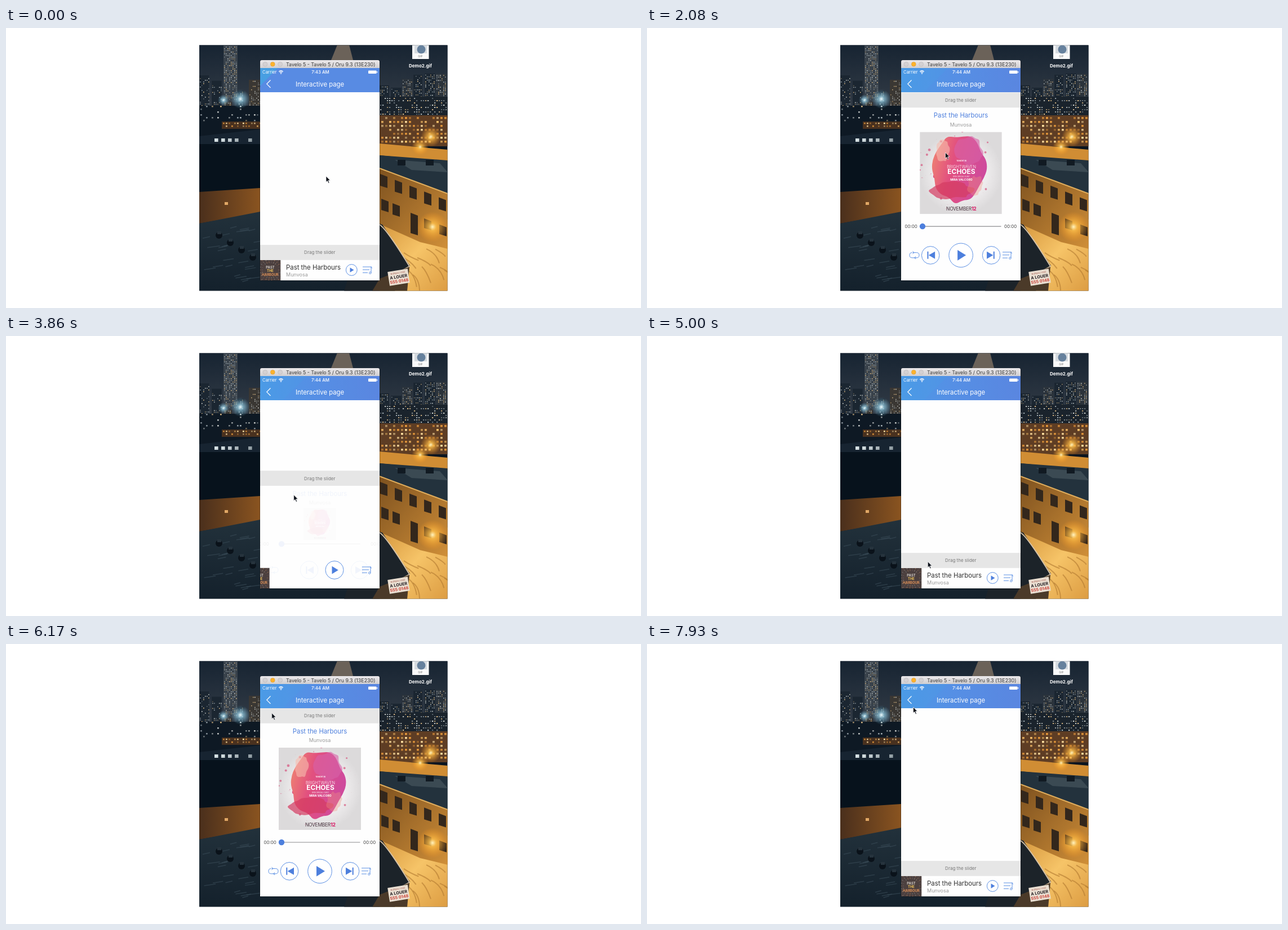
An HTML page for the animation above (8000 ms loop, 1127 by 497 pixels).

```html
<!DOCTYPE html>
<html lang="en">
<head>
<meta charset="utf-8">
<title>Interactive page</title>
<style>
html, body { margin: 0; width: 100%; height: 100%; overflow: hidden; background: #fff; }
svg { display: block; width: 1127px; height: 497px; font-family: Inter, sans-serif; }
.thin { fill: none; stroke: #5b8fe3; stroke-width: 1; vector-effect: non-scaling-stroke; }
.solid { fill: #4d7fdd; }
</style>
</head>
<body>
<svg viewBox="0 0 1127 497">
  <defs>
    <clipPath id="photoClip"><rect x="343" y="30.500" width="440.500" height="436"/></clipPath>
    <clipPath id="screenClip"><rect x="451" y="114" width="212" height="334"/></clipPath>
    <clipPath id="thumbClip"><rect width="36.500" height="36.500"/></clipPath>
    <clipPath id="coverClip"><rect width="146" height="146"/></clipPath>
    <linearGradient id="sky" x2="0" y2="1"><stop stop-color="#172432"/><stop offset="1" stop-color="#38404a"/></linearGradient>
    <linearGradient id="roof" x2="0" y2="1"><stop stop-color="#22313b"/><stop offset="1" stop-color="#14212c"/></linearGradient>
    <linearGradient id="wall" x2="1" y2="0"><stop stop-color="#4a2f1c"/><stop offset="1" stop-color="#8a5420"/></linearGradient>
    <linearGradient id="brick" x2="1" y2="1"><stop stop-color="#7d511f"/><stop offset="1" stop-color="#d08f38"/></linearGradient>
    <linearGradient id="street" x2="1" y2="1"><stop stop-color="#d3933a"/><stop offset=".5" stop-color="#f6c468"/><stop offset="1" stop-color="#dc9c42"/></linearGradient>
    <radialGradient id="warm"><stop stop-color="#fff3c0"/><stop offset=".25" stop-color="#ffc04a" stop-opacity=".8"/><stop offset="1" stop-color="#ff9a20" stop-opacity="0"/></radialGradient>
    <radialGradient id="cool"><stop stop-color="#f4ffff"/><stop offset=".3" stop-color="#9fd8ee" stop-opacity=".7"/><stop offset="1" stop-color="#6ab0d0" stop-opacity="0"/></radialGradient>
    <linearGradient id="bar" x2="0" y2="1"><stop stop-color="#ebe8ea"/><stop offset="1" stop-color="#d1cfd1"/></linearGradient>
    <linearGradient id="nav"><stop stop-color="#4c99e6"/><stop offset=".4" stop-color="#5590e5"/><stop offset="1" stop-color="#5a86e0"/></linearGradient>
    <radialGradient id="paper"><stop stop-color="#fff"/><stop offset=".65" stop-color="#edebec"/><stop offset="1" stop-color="#dcdadb"/></radialGradient>
    <linearGradient id="ink" x2="1" y2=".3"><stop stop-color="#f08a70"/><stop offset=".45" stop-color="#e2507f"/><stop offset="1" stop-color="#cf4a9c"/></linearGradient>
  </defs>
  <g id="photo" clip-path="url(#photoClip)"></g>
  <g id="phone"></g>
  <g id="screen" clip-path="url(#screenClip)"></g>
  <path id="cursor" d="M0 0V10.500L2.400 8.300 4.300 12.400 5.900 11.700 4.100 7.600H7.400Z" fill="#0a0f18" stroke="#fff" stroke-width=".7"/>
</svg>
<script>
const $ = id => document.getElementById(id);

let seed = 11;
const rnd = (lo = 0, hi = 1) => lo + (hi - lo) * ((seed = (seed * 16807) % 2147483647) / 2147483647);
const pick = list => list[Math.floor(rnd(0, list.length))];
const repeat = (n, fn) => Array.from({ length: n }, (_, i) => fn(i)).join('');

const rect = (x, y, w, h, fill, more = '') =>
  `<rect x="${x}" y="${y}" width="${w}" height="${h}" fill="${fill}" ${more}/>`;
const poly = (pts, fill) => `<polygon points="${pts}" fill="${fill}"/>`;
const dot = (x, y, r, fill, more = '') => `<circle cx="${x}" cy="${y}" r="${r}" fill="${fill}" ${more}/>`;
const path = (d, more) => `<path d="${d}" ${more}/>`;
const text = (x, y, size, str, fill, more = '') =>
  `<text x="${x}" y="${y}" font-size="${size}" fill="${fill}" ${more}>${str}</text>`;
const mid = 'text-anchor="middle"';
const bold = mid + ' font-weight="700"';
const group = (id, body, more = '') => `<g id="${id}" ${more}>${body}</g>`;

const amber = ['#ffc56a', '#e89a3c', '#ffe0a0'];
const pale = ['#d8dcd8', '#a9b4ba', '#e8c48c'];

// Scattered lit windows inside a box
function lights(x, y, w, h, step, chance, colors) {
  let out = '';
  for (let j = 0; j < h; j += step)
    for (let i = 0; i < w; i += step)
      if (rnd() < chance)
        out += rect(x + i, y + j, step * .55, step * .5, pick(colors), `opacity="${rnd(.35, 1)}"`);
  return out;
}

const tower = (x, y, w, h, fill, chance) =>
  rect(x, y, w, h, fill) + lights(x + 1, y + 2, w - 2, h - 3, 3, chance, pale);

// A row of towers with random sizes
const skyline = (x, n, gap, top) => repeat(n, i =>
  tower(x + i * gap, rnd(top, top + 28), rnd(.6, 1) * gap, 75, pick(['#1b2631', '#2b333b', '#3a3733']), rnd(.25, .6)));

// Windows along a wall that falls away to the right
const windows = (x, y, n, gap, h) => repeat(n, i => {
  const a = x + i * gap, b = y + i * gap * .4;
  return poly(`${a},${b} ${a + 13},${b + 5} ${a + 13},${b + h + 4} ${a},${b + h}`, '#33271c');
});

function leftSide() {
  let s = skyline(343, 5, 22, 84) + tower(386, 31, 25, 100, '#39424b', .6);
  s += rect(343, 138, 108, 54, '#0e1924') + lights(345, 138, 104, 26, 5, .2, pale);
  s += rect(383, 166, 68, 13, '#49311f') + lights(385, 168, 66, 10, 5, .6, amber);
  s += dot(416, 126, 17, 'url(#cool)') + dot(386, 128, 10, 'url(#cool)');
  s += poly('343,192 451,180 451,206 343,206', '#172431') + rect(343, 206, 108, 86, '#07121c');
  s += lights(358, 196, 80, 8, 12, .4, ['#d9e3e6']);
  s += poly('343,291 451,284 451,328 343,347', 'url(#wall)') + rect(388, 309, 6, 5, '#e0a765');
  s += poly('343,347 451,326 700,466 343,466', 'url(#roof)');
  s += repeat(26, () => path(`M${rnd(346, 442)} ${rnd(355, 460)}l${rnd(10, 24)} -3`,
    'stroke="#3a4c58" stroke-width="1.500" opacity=".6"'));
  return s + repeat(4, i => dot(378 + 20 * i, 368 + 13 * i, 6, '#0a121a') + rect(375 + 20 * i, 361 + 13 * i, 7, 5, '#26333d'));
}

function rightSide() {
  let s = skyline(663, 6, 20, 80);
  s += rect(663, 122, 121, 36, '#1a232c') + lights(664, 124, 118, 30, 4, .45, pale);
  s += rect(663, 155, 121, 55, '#5e3d24') + lights(666, 158, 116, 45, 7, .8, amber);
  s += poly('663,205 784,216 784,238 663,226', '#d08d34');
  s += dot(754, 193, 18, 'url(#warm)') + dot(735, 211, 15, 'url(#warm)');
  s += poly('663,226 784,235 784,294 663,249', '#23323d') + poly('690,234 770,240 784,256 720,252', '#3b4a53');
  s += repeat(2, i => rect(695 + 50 * i, 234, 14, 10, '#111a22'));
  s += rect(663, 340, 121, 127, 'url(#street)');
  s += poly('663,249 784,294 784,392 735,380 663,348', 'url(#brick)');
  s += path('M663 249 784 294', 'stroke="#e0ad5c" stroke-width="2"');
  s += windows(664, 259, 5, 26, 21) + windows(666, 303, 2, 20, 20) + windows(742, 338, 2, 27, 17) + windows(718, 328, 1, 0, 36);
  s += repeat(12, i => path(`M${690 + 8 * i} ${388 + rnd(0, 50)}q${rnd(8, 20)} 8 ${rnd(12, 30)} ${rnd(12, 30)}`,
    'fill="none" stroke="#b27a31" stroke-width="2" opacity=".6"'));
  return s + dot(757, 353, 27, 'url(#warm)');
}

function city() {
  let s = rect(343, 30, 441, 437, '#0a1520') + rect(343, 30, 441, 130, 'url(#sky)');
  s += poly('577,57 588,30 609,30 616,57', '#6b6259') + leftSide() + rightSide();
  // near roof and rental sign
  s += poly('640,340 668,349 717,422 690,467 600,467', '#1c2329');
  s += path('M663 349Q675 356 716 423L674 447', 'fill="none" stroke="#d9c4a8" stroke-width="2"');
  s += poly('663,445 716,424 712,467 650,467', '#4b3a29');
  s += '<g transform="translate(697 443) rotate(-9)">' + rect(-18, -13, 36, 25, '#eadfd2') +
    text(0, -7, 4, 'BUREAU VIDE', '#a4564a', mid) + text(0, 1, 7.3, 'A LOUER', '#272126', bold) +
    text(0, 9, 7.3, '555 0148', '#cc453b', bold) + '</g>';
  // desktop file
  s += rect(721, 28, 29.5, 27, '#fafafa') + rect(725, 30, 22, 15, '#d6dbe0') + dot(737, 38, 7.5, '#66819d');
  return s + text(735.5, 52.3, 5.3, 'GIF', '#777', mid) + text(735.5, 70.3, 8, 'Demo2.gif', '#fff', bold);
}

function frame() {
  let s = rect(450, 57, 214, 392, '#000', 'opacity=".25" rx="3"') + rect(451, 71, 212, 377, '#fefefe');
  s += path('M451 71V60Q451 57 454 57H660Q663 57 663 60V71Z', 'fill="url(#bar)"');
  s += repeat(3, i => dot(460 + 13.3 * i, 64.2, 4, i === 1 ? '#fdb22c' : '#d4d1d3', 'stroke="#0002" stroke-width=".6"'));
  s += text(497, 67.5, 8.9, 'Tavelo 5 - Tavelo 5 / Oru 9.3 (13E230)', '#3b3b3b');
  s += group('navA', rect(451, 71, 212, 43, '#588be3') + poly('451,71 482,71 451,103', '#489fe2'));
  s += group('navB', rect(451, 71, 212, 43, 'url(#nav)') + poly('451,71 534,71 491,114 451,114', 'rgba(72,160,230,.2)'));
  s += text(455, 81.3, 7.8, 'Carrier', '#fff') +
    `<text id="clock" x="558" y="81.300" font-size="7.900" font-weight="500" fill="#fff" ${mid}></text>`;
  s += path('M484.300 77.500Q488 74 491.700 77.500M485.900 79.200Q488 77.200 490.100 79.200', 'fill="none" stroke="#fff" stroke-width="1.200"') + dot(488, 80.8, 1, '#fff');
  s += rect(643, 75.5, 14.5, 5.5, '#fff', 'rx="1"') + rect(658, 77, 1.2, 2.5, '#fff');
  s += path('M469.500 92.500 462.800 99.300 469.500 106', 'fill="none" stroke="#fff" stroke-width="1.200"');
  return s + text(557, 103.5, 11.3, 'Interactive page', '#fff', mid);
}

function thumb() {
  const rays = repeat(88, k => {
    const a = k * Math.PI / 11, r = 13 + 4.2 * Math.floor(k / 22);
    const at = d => `${18 + (r + d) * Math.cos(a)} ${18 + (r + d) * Math.sin(a)}`;
    return path(`M${at(0)}L${at(2.2)}`, `stroke="${pick(['#b9825a', '#80888c', '#a89a8c', '#716263'])}" stroke-width=".8"`);
  });
  const words = ['PAST', 'THE', 'HARBOUR'], tints = ['#d5cfc9', '#edc35c', '#e0935a'];
  return rect(0, 0, 36.5, 36.5, '#4c403f') + rays + rect(5, 10, 27, 18, '#4c403f') +
    repeat(3, i => text(18, 15 + 6.5 * i, 5.9, words[i], tints[i], bold));
}

// Rounded ink stain with a ragged edge
function stain(x, y, rx, ry, rough, fill, opacity = 1) {
  const n = 22, pts = Array.from({ length: n }, (_, i) => {
    const a = i * 2 * Math.PI / n, k = 1 + rnd(-rough, rough);
    return [x + rx * k * Math.cos(a), y + ry * k * Math.sin(a)];
  });
  const half = i => pts[i].map((v, k) => (v + pts[(i + 1) % n][k]) / 2).join(' ');
  return path(`M${half(n - 1)}` + repeat(n, i => `Q${pts[i].join(' ')} ${half(i)}`), `fill="${fill}" opacity="${opacity}"`);
}

function cover() {
  let s = rect(0, 0, 146, 146, 'url(#paper)');
  s += repeat(60, () => {
    const a = rnd(0, 2 * Math.PI), r = rnd(42, 74);
    return dot(68 + r * Math.cos(a), 68 + r * Math.sin(a), .2 + rnd() ** 4 * 2.5, '#d6567f', 'opacity=".7"');
  });
  s += dot(27, 79, 3.2, '#db4779') + stain(70, 66, 48, 59, .1, 'url(#ink)');
  s += stain(41, 33, 12, 20, .2, '#f7bcb0', .6) + stain(88, 33, 25, 23, .2, '#d763a8', .6);
  s += stain(56, 104, 36, 15, .2, '#d53b62', .7) + stain(98, 96, 14, 18, .3, '#f0937f', .35);
  s += text(74, 53, 3, 'TONIGHT IN', '#fff', bold) + text(74, 65, 7.2, 'BRIGHTWAVEN', '#fff', mid + ' font-weight="300"');
  s += text(74, 75, 12, 'ECHOES', '#fff', bold) + text(74, 81, 2.8, 'WITH SPECIAL GUEST', '#fff', mid);
  s += text(74, 86.5, 5.1, 'MIRA VALCORO', '#fff', bold);
  return s + text(47, 140, 8.5, 'NOVEMBER<tspan fill="#d6296d" font-weight="800">12</tspan>', '#49343f', 'letter-spacing="-.3"');
}

function controls() {
  const title = 'Past the Harbours', artist = 'Munvosa';
  let full = group('head', text(557, 44.7, 11.3, title, '#4d7fdd', mid) + text(557, 60.2, 9, artist, '#9a9a9a', mid));
  full += group('cover', cover(), 'clip-path="url(#coverClip)"');
  full += group('track', path('M489 0H628.500', 'stroke="#8b8b8f" stroke-width="1.200"') + dot(489, 0, 5.2, '#4d7fdd') +
    group('left', text(457.5, 2.9, 7.9, '00:00', '#444')) + group('right', text(634, 2.9, 7.9, '00:00', '#444')));
  const skip = dot(0, 0, 15.8, 'none', 'class="thin"') + path('M-3.300 0 8 -6.500V6.500ZM-5.700 -6.500h2v13h-2Z', 'class="solid"');
  full += group('prev', skip) + group('next', `<g transform="scale(-1 1)">${skip}</g>`);
  full += group('repeat', path('M-3 -4.700H4Q8.500 -4.700 8.500 0Q8.500 4.500 4 4.500H2M3 4.500H-4Q-8.500 4.500 -8.500 0Q-8.500 -4.700 -4 -4.700M-3 -7 -.500 -4.700 -3 -2.500M2.500 2.300 0 4.500 2.500 6.700', 'class="thin"'));
  const mini = text(497, 428.5, 11.4, title, '#333') + text(497, 440.5, 9, artist, '#999');
  return group('full', full) + group('mini', mini) +
    group('thumb', thumb(), 'clip-path="url(#thumbClip)"') +
    group('play', dot(0, 0, 21.3, '#fff', 'class="thin" style="fill:#fff"') + path('M-6 -9.300 9 0 -6 9.300Z', 'class="solid"')) +
    group('list', path('M-8 -5.500H8M-8 -.500H4M-8 4.800H1M7 -5.500V5M7 -5.500 8.700 -3', 'class="thin"') + dot(5.3, 5.2, 1.7, 'none', 'class="thin"')) +
    group('slider', rect(451, 0, 212, 26.8, '#e6e6e6') + text(556.8, 16.4, 8, 'Drag the slider', '#777', mid));
}

$('photo').innerHTML = city();
$('phone').innerHTML = frame();
$('screen').innerHTML = controls();

const LOOP = 8000, TOP = 114, BOTTOM = 385;

// Slider opens and closes in turn: start, end
const swipes = [[1350, 2100], [3230, 4560], [5180, 5900], [6790, 7390]];

// Pointer legs: start, end, and where each one leads
const home = [568, 263];
const legs = [
  [270, 1080, 511, 400.5], [1230, 2080, 529.5, 221], [2170, 3050, 510.7, 122], [3230, 3860, 510.7, 282],
  [3950, 5000, 498.3, 400.5], [5180, 6000, 471.7, 122.5], [7760, 7930, 472.5, 112]
];

const clamp = v => Math.max(0, Math.min(1, v));
const mix = (a, b, p) => a + (b - a) * p;
const ease = (t, a, b) => { const u = clamp((t - a) / (b - a)); return u * u * (3 - 2 * u); };
const place = (id, x, y, s = 1) => $(id).setAttribute('transform', `translate(${x} ${y}) scale(${s})`);
const fade = (id, v) => $(id).setAttribute('opacity', v);

const openness = t => swipes.reduce((p, [a, b], i) => p + (i % 2 ? -1 : 1) * ease(t, a, b), 0);
const pointer = t => legs.reduce(([x, y], [a, b, toX, toY]) => {
  const k = ease(t, a, b);
  return [mix(x, toX, k), mix(y, toY, k)];
}, home);

function draw(t) {
  const p = openness(t), rest = 1 - p, y = mix(BOTTOM, TOP, p);
  const late = t >= 270;
  $('clock').textContent = late ? '7:44 AM' : '7:43 AM';
  fade('navA', late ? 0 : 1);
  fade('navB', late ? 1 : 0);

  fade('full', clamp(2 * p - 1));
  fade('mini', clamp(1 - 2 * p));
  const rowY = mix(429.5, 403.3, p);
  const size = Math.max(1, 146 - 192 * rest);
  place('slider', 0, y);
  place('head', 0, y);
  place('cover', 557 - size / 2, y + 70 - 9 * rest, size / 146);
  place('track', 0, 352 + 37 * rest);
  place('left', -28 * rest, 0);
  place('right', 28 * rest, 0);
  place('prev', 503 + 76 * rest, rowY);
  place('next', 611 + 37 * rest, rowY);
  place('repeat', 474.5, rowY);
  place('thumb', 451 - 36.6 * p, 411.5);
  place('play', mix(613.3, 557, p), rowY, mix(.465, 1, p));
  place('list', mix(641, 639, p), rowY);
  place('cursor', ...pointer(t));
}

const start = performance.now();
function tick() {
  draw((performance.now() - start) % LOOP);
  requestAnimationFrame(tick);
}
tick();
</script>
</body>
</html>
```
